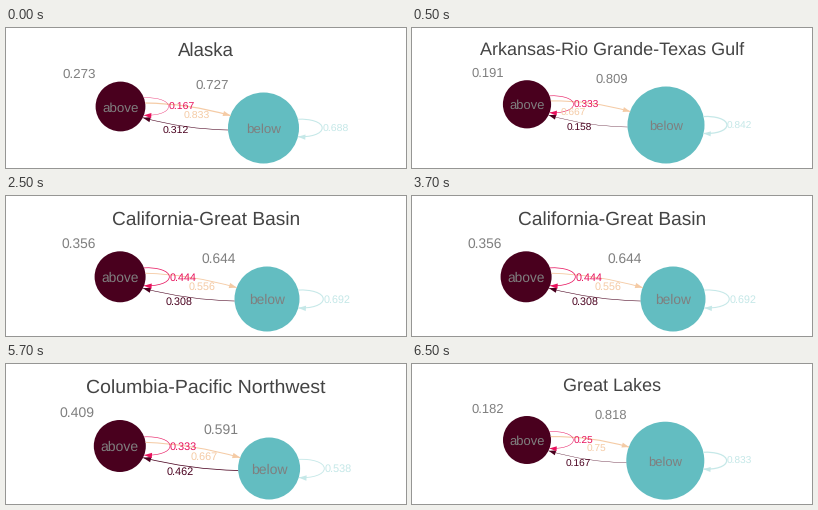
Write a matplotlib script that moves like this. It is 400 by 140 pixels and loops after 8 s.

```python
import math
import matplotlib.pyplot as plt
from matplotlib.animation import FuncAnimation
from matplotlib.patches import Circle, PathPatch, Polygon
from matplotlib.path import Path

W, H, DPI = 400, 140, 100
PX = 72 / DPI
STEP = 500

DARK, TEAL = "#49001e", "#63bdc1"
PINK, PEACH, PALE = "#e8105c", "#f5cba5", "#c5e8e8"
TITLE, GREY = "#444444", "#7f7f7f"

# title, steps shown, (x, y, r) of both nodes, share above and below,
# chances above-above, above-below, below-above, below-below,
# positions of the two crossing labels
SCENES = [
    ("Alaska", 1, (114.5, 78.5, 24.9), (257.5, 100, 35.5), "0.273", "0.727",
     ("0.167", "0.833", "0.312", "0.688"), (191, 87), (169.5, 102.7)),
    ("Arkansas-Rio Grande-Texas Gulf", 4, (115, 76.3, 24.1), (254, 97, 38.5), "0.191", "0.809",
     ("0.333", "0.667", "0.158", "0.842"), (161.7, 84), (167, 99.7)),
    ("California-Great Basin", 4, (114.1, 80.8, 25.5), (261, 103, 32.5), "0.356", "0.644",
     ("0.444", "0.556", "0.308", "0.692"), (196, 89.8), (173, 105.5)),
    ("Columbia-Pacific Northwest", 4, (113.8, 82, 26), (263.1, 104.5, 31), "0.409", "0.591",
     ("0.333", "0.667", "0.462", "0.538"), (198, 91.7), (174.5, 107.3)),
    ("Great Lakes", 3, (115, 76, 24), (253.3, 96.7, 39), "0.182", "0.818",
     ("0.25", "0.75", "0.167", "0.833"), (184.5, 84), (166, 99.7)),
]
TIMELINE = [scene for scene in SCENES for _ in range(scene[1])]

plt.rcParams["font.family"] = "Liberation Sans"
plt.rcParams["text.hinting"] = "none"
fig = plt.figure(figsize=(W / DPI, H / DPI), dpi=DPI, facecolor="white")
ax = fig.add_axes([0, 0, 1, 1])


def text(x, y, label, size, color, ha="center"):
    """Write a label with its capitals centred on y."""
    ax.text(x, y + 0.345 * size, label, fontsize=size * PX, color=color,
            ha=ha, va="baseline", zorder=4)


def arrow(points, chance, color, unit):
    """Bezier curve with a head at its last point; width follows the chance."""
    curve = Path.CURVE3 if len(points) == 3 else Path.CURVE4
    codes = [Path.MOVETO] + [curve] * (len(points) - 1)
    width = 0.15 + 1.3 * float(chance)
    ax.add_patch(PathPatch(Path(points, codes), fill=False, ec=color,
                           lw=width * PX, capstyle="butt", zorder=2))
    (cx, cy), (tx, ty) = points[-2:]
    length = math.hypot(tx - cx, ty - cy)
    ux, uy = (tx - cx) / length, (ty - cy) / length
    long, half = 0.3 * unit, 0.105 * unit
    bx, by = tx - long * ux, ty - long * uy
    ax.add_patch(Polygon([(tx, ty), (bx - half * uy, by + half * ux),
                          (bx + half * uy, by - half * ux)], fc=color, lw=0, zorder=3))


def self_loop(node, chance, color, unit):
    x, y, r = node
    rise = 0.35 * unit
    start = x + math.sqrt(r * r - rise * rise)
    far = x + r + 0.93 * unit
    middle = (start + far) / 2
    arrow([(start, y - rise), (middle, y - 1.08 * rise), (far, y - 0.7 * rise), (far, y),
           (far, y + 0.7 * rise), (middle, y + 1.08 * rise), (start, y + rise)],
          chance, color, unit)
    text(far, y, chance, 0.42 * unit, color, "left")


def link(start, end, bulge, chance, color, unit):
    middle = ((start[0] + end[0]) / 2, (start[1] + end[1]) / 2 + bulge)
    arrow([start, middle, end], chance, color, unit)


def draw_node(node, name, share, color, unit):
    x, y, r = node
    size = 0.54 * unit
    ax.add_patch(Circle((x, y), r, fc=color, lw=0, zorder=1))
    text(x, y + 0.3, name, size, GREY)
    text(x - r - 0.64 * unit, y - r - 0.32 * unit, share, size, GREY)


def draw(frame):
    title, _, above, below, share_a, share_b, chances, to_below, to_above = TIMELINE[frame]
    stay_a, fall, rise, stay_b = chances
    left, top, unit = above
    right, low, big = below
    ax.clear()
    ax.set(xlim=(0, W), ylim=(H, 0))
    ax.axis("off")

    # the radius of the left node sets the scale of the whole picture
    text(W / 2, 0.86 * unit, title, 0.75 * unit, TITLE)
    draw_node(above, "above", share_a, DARK, unit)
    draw_node(below, "below", share_b, TEAL, unit)

    link((left + 0.99 * unit, top - 0.14 * unit), (right - 0.93 * big, low - 0.35 * big),
         -6, fall, PEACH, unit)
    link((right - big, low + 2), (left + 0.9 * unit, top + 0.45 * unit),
         5.5, rise, DARK, unit)
    text(*to_below, fall, 0.42 * unit, PEACH)
    text(*to_above, rise, 0.42 * unit, DARK)
    self_loop(above, stay_a, PINK, unit)
    self_loop(below, stay_b, PALE, unit)
    return []


anim = FuncAnimation(fig, draw, frames=len(TIMELINE), interval=STEP,
                     init_func=lambda: draw(0), repeat=True, repeat_delay=0)
plt.show()
```
